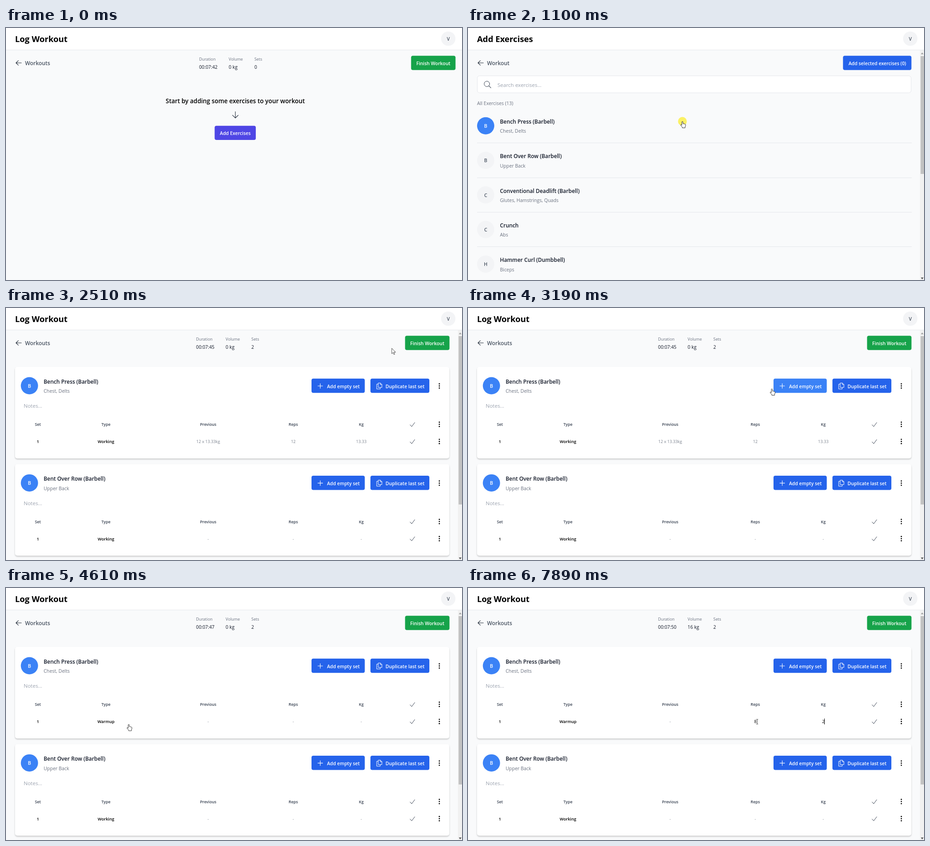
Write an HTML page that moves like this. It is 1006 px wide and 556 px high and loops after 8000 ms.

```html
<!DOCTYPE html>
<html lang="en">
<head>
<meta charset="utf-8">
<title>Workout log</title>
<style>
  html, body { margin: 0; width: 100%; height: 100%; overflow: hidden; background: #f9fafb; }
  svg { display: block; font-family: "Open Sans", "Noto Sans", sans-serif; }
  text { fill: #111827; white-space: pre; }
  .mid { text-anchor: middle; }
  .title { font-size: 18.25px; font-weight: 700; fill: #000; }
  .back { font-size: 11.9px; font-weight: 600; fill: #4b5563; }
  .lead { font-size: 13.42px; font-weight: 600; fill: #000; }
  .name { font-size: 11.87px; font-weight: 600; }
  .sub { font-size: 10.45px; fill: #6b7280; }
  .hint { font-size: 11.5px; fill: #9ca3af; }
  .label { font-size: 8.85px; fill: #6b7280; }
  .stat { font-size: 10.25px; }
  .btn { font-size: 10.35px; font-weight: 600; fill: #fff; }
  .head { font-size: 8.75px; font-weight: 600; fill: #374151; }
  .cell { font-size: 9.1px; font-weight: 600; fill: #000; }
  .ghost { font-size: 9px; fill: #7b828e; }
  .typed { font-size: 9px; fill: #000; }
  .initial { font-size: 10.6px; font-weight: 600; fill: #4b5563; }
  .initial.on { fill: #fff; }
  .line { fill: none; stroke: #374151; stroke-linecap: round; stroke-linejoin: round; }
  .card { fill: #fff; filter: drop-shadow(0 2px 1.8px #0003); }
</style>
</head>
<body>
<svg id="stage" width="1006" height="556" viewBox="0 0 1006 556"></svg>
<script>
const LOOP = 8000;
const BLUE = '#2563eb', LIGHT = '#3b82f6', GREY = '#f3f4f6';

// Drawing helpers
const text = (x, y, cls, str, id = '') => `<text x="${x}" y="${y}" class="${cls}" id="${id}">${str}</text>`;
const line = (d, color = '#1f2937', width = 1.1) =>
  `<path class="line" d="${d}" style="stroke:${color};stroke-width:${width}"/>`;
const box = (x, y, w, h, fill, id = '', r = 4) =>
  `<rect x="${x}" y="${y}" width="${w}" height="${h}" rx="${r}" fill="${fill}" id="${id}"/>`;
const group = (id, body) => `<g id="${id}">${body}</g>`;
const avatar = (x, y, letter, on, id = '') =>
  `<circle cx="${x}" cy="${y}" r="19" fill="${on ? LIGHT : GREY}" id="${id}"/>` +
  text(x, y + 4.3, 'initial mid' + (on ? ' on' : ''), letter, id && id + 'Letter');
const dots = y => [-4.7, 0, 4.7].map(d => `<circle cx="956" cy="${y + d}" r="1.4"/>`).join('');
const tick = y => line(`M891.5 ${y + .7}l3.6 4 6.6 -9`, '#374151', 1);
const scrollbar = end => box(997, 49, 9, 507, '#f1f1f1', '', 0) + box(998.5, 62, 7.5, end - 62, '#c1c1c1', '', 0) +
  '<path d="M999 58h6l-3 -4z" fill="#a3a3a3"/><path d="M999 550.5h6l-3 4z" fill="#505050"/>';
const backLink = label => line('M34 77H22M27.3 71.8L22 77l5.3 5.2') + text(42, 82, 'back', label);

function emptyPage() {
  return text(505.8, 165.5, 'lead mid', 'Start by adding some exercises to your workout') +
    line('M506 184.5V198.5M499.7 192.3l6.3 6.3 6.3 -6.3') +
    box(460.3, 215.7, 90.8, 31.4, '#4f46e5', 'addBtn') + text(505.8, 236.3, 'btn mid', 'Add Exercises');
}

function pickPage() {
  const rows = [
    ['Bench Press (Barbell)', 'Chest, Delts'],
    ['Bent Over Row (Barbell)', 'Upper Back'],
    ['Conventional Deadlift (Barbell)', 'Glutes, Hamstrings, Quads'],
    ['Crunch', 'Abs'],
    ['Hammer Curl (Dumbbell)', 'Biceps']];
  return backLink('Workout') +
    box(827.3, 61.2, 151, 31.5, BLUE, 'pickBtn') + text(903, 82, 'btn mid', '', 'pickLabel') +
    '<rect x="20.5" y="105.5" width="957" height="37.5" rx="5" fill="#fff" stroke="#e5e7eb"/>' +
    '<circle class="line" cx="41.7" cy="123.3" r="6"/>' + line('M46.1 127.7l4.4 4.4', '#374151') +
    text(65, 129.7, 'hint', 'Search exercises...') + text(20, 170, 'sub', 'All Exercises (13)') +
    rows.map(([name, muscles], i) => {
      const y = 215.7 + 76.3 * i;
      return avatar(39, y, name[0], false, 'pick' + i) +
        text(70.5, y - 4.6, 'name', name) + text(70.5, y + 15.6, 'sub', muscles) +
        (i < 4 ? box(20, Math.round(y + 37.5), 959, 1, '#e5e7eb', '', 0) : '') +
        (i < 2 ? group('mark' + i, line(`M962.5 ${y + .8}l4 4.6 8.5 -11`, LIGHT, 1.2)) : '');
    }).join('') + scrollbar(322);
}

function card(i, name, muscles, values) {
  const columns = [70.3, 220.5, 446, 633.8, 783.8];
  const row = (y, items, cls, prefix) =>
    items.map((s, c) => text(columns[c], y, `${cls(c)} mid`, s, prefix && prefix + c)).join('');
  return `<g transform="translate(0 ${214.4 * i})">` +
    '<rect class="card" x="20" y="130" width="958" height="202" rx="5"/>' +
    avatar(51.7, 171.5, name[0], true) + text(83, 167, 'name', name) + text(83, 187.2, 'sub', muscles) +
    box(674, 155.7, 117.5, 31.5, BLUE, 'emptyBtn' + i) + line('M688 172h10.6M693.3 166.7v10.6', '#fff') +
    text(744.2, 176.5, 'btn mid', 'Add empty set') +
    box(804, 155.7, 130, 31.5, BLUE) +
    line('M821.5 165.5h4.5l3.3 3.3v6.4h-7.8zM825.8 165.7v3.3h3.3M821 168h-3.2v10.7h7.8v-3', '#fff', 1) +
    text(880.3, 176.5, 'btn mid', 'Duplicate last set') +
    text(39, 220.3, 'hint', 'Notes...') +
    row(260.2, ['Set', 'Type', 'Previous', 'Reps', 'Kg'], () => 'head', '') +
    row(298.2, ['1', 'Working', ...values], c => c < 2 ? 'cell' : 'ghost', 'v' + i) +
    tick(257) + tick(294.7) + dots(172) + dots(256.7) + dots(294.5) + '</g>';
}

document.getElementById('stage').innerHTML =
  box(0, 0, 1006, 556, '#f9fafb', '', 0) + box(0, 0, 1006, 48, '#fff', '', 0) + box(0, 48, 1006, 1, '#e5e7eb', '', 0) +
  text(20, 30.7, 'title', '', 'title') +
  `<circle cx="975.7" cy="23.5" r="15.8" fill="${GREY}"/>` + text(975.7, 28, 'initial mid', 'V') +
  group('log', backLink('Workouts') +
    group('stats', text(426, 71.5, 'label', 'Duration') + text(491.3, 71.5, 'label', 'Volume') +
      text(548, 71.5, 'label', 'Sets') + text(426, 89.8, 'stat', '', 'clock') +
      text(491.3, 89.8, 'stat', '', 'volume') + text(548, 89.8, 'stat', '', 'sets')) +
    group('finish', box(893.7, 61.2, 98, 31.5, '#16a34a') + text(942.7, 82, 'btn mid', 'Finish Workout'))) +
  group('empty', emptyPage()) +
  group('pick', pickPage()) +
  group('filled', card(0, 'Bench Press (Barbell)', 'Chest, Delts', ['', '', '']) +
    card(1, 'Bent Over Row (Barbell)', 'Upper Back', ['-', '-', '-']) +
    box(0, 288, 1, 13, '#000', 'caret', 0) + scrollbar(433.5)) +
  group('cursor',
    '<circle id="click" r="9.7" fill="#fbef4a" opacity=".85"/>' +
    '<path id="hand" d="M-1.2 .9Q0 -.7 1.2 .9V5l1.8 .2 1.8 .5 1.7 .7Q7.2 7 7 9.3L6 12v2.3H-.2V12.8L-3.8 8.6Q-4 7 -2.6 7.2L-1.2 8.5z" fill="#fff" stroke="#222" stroke-width=".9" stroke-linejoin="round"/>' +
    '<path id="arrow" d="M0 0V12l2.8 -2.5 2 4.4 1.8 -.8 -2 -4.3H8.5z" fill="#fff" stroke="#222" stroke-width=".8"/>' +
    '<path id="beam" d="M-2 -5.3h1.4l.6 .6 .6 -.6H2M0 -4.7V4.7M-2 5.3h1.4l.6 -.6 .6 .6H2" fill="none" stroke="#222" stroke-width=".9"/>');

// Timeline
const path = [
  [0, 612, 572], [30, 608, 562], [480, 498, 233], [680, 494, 230], [1070, 473, 206], [1190, 473, 206],
  [1390, 487, 275], [1610, 487, 275], [1790, 720, 160], [1920, 837, 83], [2080, 872, 75], [2260, 872, 75],
  [3050, 735, 158], [3190, 671, 178], [3500, 475, 249], [3800, 311, 294], [3850, 277, 298],
  [3980, 254, 301], [4510, 254, 301], [5190, 637, 295], [5320, 638, 295], [8000, 638, 295]];
const shapes = [[0, 'arrow'], [430, 'hand'], [1790, 'arrow'], [1890, 'hand'], [2450, 'arrow'], [3050, 'hand'],
  [3230, 'arrow'], [3740, 'hand'], [4640, 'arrow'], [4920, 'beam']];
const clicks = [[520, 660], [1060, 1210], [1390, 1420], [2240, 2420], [4000, 4200], [5080, 5190]];
const seconds = [450, 1430, 2400, 3370, 4330, 5320, 6280, 7250];
const carets = [[5080, 5610, 634], [6130, 6660, 634], [7180, 7350, 634], [7350, 7600, 636],
  [7600, 7890, 784], [7890, 8000, 786]];

const el = id => document.getElementById(id);
const show = (id, on) => el(id).style.display = on ? '' : 'none';
const write = (id, str) => { if (el(id).textContent !== str) el(id).textContent = str; };
const paint = (id, color) => el(id).setAttribute('fill', color);
const active = (spans, t) => spans.find(([from, to]) => t >= from && t < to);

// Velocity at a path point; zero at rests and at the ends.
function slope(i, axis) {
  const a = path[i - 1], p = path[i], b = path[i + 1];
  if (!a || !b || a[1] === p[1] || b[1] === p[1]) return 0;
  return (b[axis] - a[axis]) / (b[0] - a[0]);
}

function position(t, axis) {
  const i = path.findLastIndex(p => p[0] <= t), a = path[i], b = path[i + 1] || a;
  const span = b[0] - a[0] || 1, u = (t - a[0]) / span, w = u * u * (3 - 2 * u);
  return a[axis] + (b[axis] - a[axis]) * w +
    span * u * (1 - u) * (slope(i, axis) * (1 - u) - slope(i + 1, axis) * u);
}

function render(t) {
  const page = t < 680 ? 'empty' : t < 2450 ? 'pick' : 'filled';
  for (const id of ['empty', 'pick', 'filled']) show(id, id === page);
  show('log', page !== 'pick');
  write('title', page === 'pick' ? 'Add Exercises' : 'Log Workout');
  el('stats').setAttribute('transform', `translate(${page === 'filled' ? -6.7 : 0} 0)`);
  el('finish').setAttribute('transform', `translate(${page === 'filled' ? -13.3 : 0} 0)`);

  write('clock', '00:07:' + (42 + seconds.filter(s => s <= t).length));
  write('volume', t < 7890 ? '0 kg' : '16 kg');
  write('sets', page === 'filled' ? '2' : '0');

  [1060, 1400].forEach((at, i) => {
    paint('pick' + i, t >= at ? LIGHT : GREY);
    el(`pick${i}Letter`).classList.toggle('on', t >= at);
  });
  const marks = [1190, 1410];
  marks.forEach((at, i) => show('mark' + i, t >= at));
  write('pickLabel', `Add selected exercises (${marks.filter(m => t >= m).length})`);

  paint('addBtn', t >= 430 ? '#6366f1' : '#4f46e5');
  paint('pickBtn', t >= 1900 ? LIGHT : BLUE);
  paint('emptyBtn0', t >= 3040 && t < 3230 ? LIGHT : BLUE);

  const warm = t >= 4030;
  write('v01', warm ? 'Warmup' : 'Working');
  write('v02', warm ? '-' : '12 x 13.33kg');
  write('v03', t >= 7350 ? '8' : warm ? '-' : '12');
  write('v04', t >= 7890 ? '2' : warm ? '-' : '13.33');
  el('v03').classList.toggle('typed', t >= 7350);
  el('v04').classList.toggle('typed', t >= 7890);

  const caret = active(carets, t);
  show('caret', caret);
  if (caret) el('caret').setAttribute('x', caret[2]);

  const shape = shapes.findLast(s => s[0] <= t)[1];
  for (const id of ['hand', 'arrow', 'beam']) show(id, id === shape);
  show('click', active(clicks, t));
  el('cursor').setAttribute('transform', `translate(${position(t, 1).toFixed(2)} ${position(t, 2).toFixed(2)})`);
}

const start = performance.now();
function frame() {
  render((performance.now() - start) % LOOP);
  requestAnimationFrame(frame);
}
frame();
</script>
</body>
</html>
```
